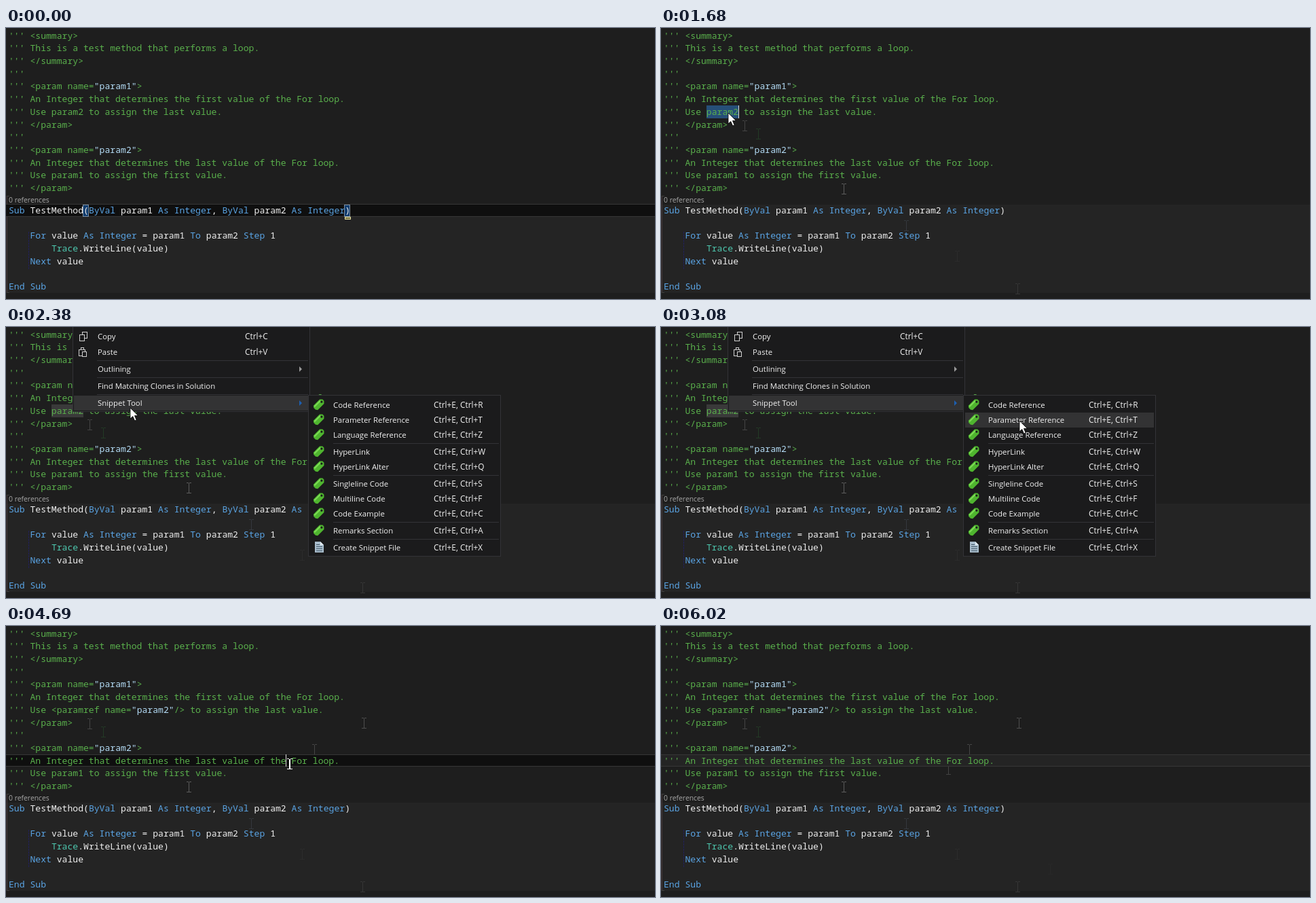
These frames come from a looping animation (956x399 px, 6.09 s). An HTML page with a canvas:

```html
<!DOCTYPE html>
<html lang="en">
<head>
<meta charset="utf-8">
<title>Snippet menu in a code editor</title>
<style>
html, body { margin: 0; width: 100%; height: 100%; overflow: hidden; background: #1e1e1e; }
canvas { display: block; }
</style>
</head>
<body>
<canvas id="stage" width="956" height="399"></canvas>
<script>
const ctx = document.getElementById('stage').getContext('2d');
const LOOP = 6090, STEP = 70;
const X0 = 4, CHAR = 7.86, ROW = 18.7, DOC_TOP = 2.12, CODE_TOP = 259.3;
const MONO = '13.1px "Noto Sans Mono", monospace';
const SANS = '"Open Sans", sans-serif';
const GREEN = '#5ab04c', BLUE = '#5aa4e4', PLAIN = '#efefef', TYPE = '#4ec9b0', VALUE = '#b4dcf6';
const EDGE = '#333337';

const docs = [
  '<summary>', 'This is a test method that performs a loop.', '</summary>', '',
  '<param name="param1">', 'An Integer that determines the first value of the For loop.',
  'Use param2 to assign the last value.', '</param>', '',
  '<param name="param2">', 'An Integer that determines the last value of the For loop.',
  'Use param1 to assign the first value.', '</param>'
];
const code = [
  'Sub TestMethod(ByVal param1 As Integer, ByVal param2 As Integer)', '',
  '    For value As Integer = param1 To param2 Step 1',
  '        Trace.WriteLine(value)', '    Next value', '', 'End Sub'
];
// label, shortcut, vertical centre
const mainItems = [
  ['Copy', 'Ctrl+C', 14], ['Paste', 'Ctrl+V', 36.5], ['Outlining', '', 62],
  ['Find Matching Clones in Solution', '', 87], ['Snippet Tool', '', 112]
];
const subItems = [
  ['Code Reference', 'R', 114.5], ['Parameter Reference', 'T', 136.5], ['Language Reference', 'Z', 158.5],
  ['HyperLink', 'W', 183.5], ['HyperLink Alter', 'Q', 205.5],
  ['Singleline Code', 'S', 230.5], ['Multiline Code', 'F', 252.5], ['Code Example', 'C', 274.5],
  ['Remarks Section', 'A', 299.5], ['Create Snippet File', 'X', 324.5]
];
// time, x, y
const beamIn = [[350, 525, 384], [420, 436, 336], [490, 361, 291], [560, 269, 237],
  [700, 143, 156], [840, 123, 144], [910, 115, 137], [1050, 100, 126]];
const arrowPath = [[2030, 99, 125], [2100, 115, 122], [2170, 146, 120], [2240, 170, 120], [2310, 170, 120],
  [2380, 183, 119], [2660, 380, 119], [2940, 524, 137], [3080, 528, 138]];
const beamOut = [[3780, 527, 143], [3990, 454, 182], [4270, 418, 203], [4690, 418, 203],
  [4760, 423, 211], [4970, 573, 358], [5040, 606, 387]];
// faint cursor traces: time, x, y, colour
const traces = [
  [420, 525, 384, '#363636'], [490, 436, 336, '#2b2b2b'], [560, 361, 291, '#34383d'],
  [630, 269, 237, '#5c5c5c'], [770, 143, 156, '#233a25'], [910, 123, 144, '#444444'],
  [3850, 527, 143, '#4e4e4e'], [4060, 454, 182, '#464646'], [4830, 423, 211, '#424242'],
  [5040, 573, 358, '#282828']
];

function rect(x, y, w, h, color) {
  ctx.fillStyle = color;
  ctx.fillRect(x, y, w, h);
}

function frame(x, y, w, h, fill, stroke) {
  rect(x, y, w, h, stroke);
  rect(x + 1, y + 1, w - 2, h - 2, fill);
}

function text(str, x, y, color, font) {
  ctx.font = font;
  ctx.fillStyle = color;
  ctx.fillText(str, x, y);
}

function poly(points, color) {
  ctx.fillStyle = color;
  ctx.beginPath();
  points.forEach(([x, y]) => ctx.lineTo(x, y));
  ctx.closePath();
  ctx.fill();
}

const col = n => X0 + n * CHAR;
const docTop = row => DOC_TOP + row * ROW;
// whole-pixel top and height of the line that starts at y
const span = y => [Math.floor(y), Math.floor(y + ROW) - Math.floor(y)];

function codeLine(str, top, splitter, colorOf) {
  let n = 0;
  for (const part of str.split(splitter)) {
    text(part, col(n), Math.floor(top) + 14, colorOf(part), MONO);
    n += part.length;
  }
}

const docColor = s => s[0] === '"' ? VALUE : GREEN;
const codeColor = s => s === 'Trace' ? TYPE
  : /^(Sub|ByVal|As|Integer|For|To|Step|Next|End)$/.test(s) ? BLUE : PLAIN;

function along(path, t) {
  let i = 1;
  while (i < path.length - 1 && path[i][0] < t) i++;
  const [t0, x0, y0] = path[i - 1], [t1, x1, y1] = path[i];
  const k = Math.min(1, Math.max(0, (t - t0) / (t1 - t0)));
  return [Math.round(x0 + (x1 - x0) * k), Math.round(y0 + (y1 - y0) * k)];
}

function beam(x, y, color, width = 1) {
  rect(x, y - 7, width, 15, color);
  for (const end of [y - 8, y + 7]) {
    rect(x - 3, end, 3, 1, color);
    rect(x + width, end, 3, 1, color);
  }
}

function arrow(x, y) {
  ctx.save();
  ctx.translate(x, y);
  const shape = [[0, 0], [0, 16], [3.8, 12.6], [6.6, 19], [9.2, 17.9], [6.5, 11.6], [11.6, 11.6]];
  poly(shape, '#fff');
  ctx.strokeStyle = '#000';
  ctx.lineWidth = 0.8;
  ctx.stroke();
  ctx.restore();
}

function lineMark(top, focused = true) {
  const [y, h] = span(top);
  frame(-1, y, 958, h, focused ? '#0f0f0f' : '#242424', '#363636');
}

function caret(n, top) {
  const [y, h] = span(top);
  rect(Math.floor(col(n)), y, 1, h, '#dcdcdc');
}

const blinkOn = (t, start) => (t - start) % 350 < 210;

function editor(t) {
  const inserted = t >= 3500, untouched = t < 1190;
  const first = docTop(6), second = docTop(10);
  rect(0, 0, 956, 399, '#1e1e1e');
  rect(0, 260, 956, 130, '#242424');
  rect(1, 247, 1, 143, '#45373a');
  rect(1, 247, 4, 1, '#3f3f3f');
  rect(1, 389, 4, 1, '#3f3f3f');
  for (let y = 300; y < 353; y += 4) rect(33, y, 1, 3, '#20205c');
  for (const [start, x, y, color] of traces) if (t >= start) beam(x, y, color);

  if (untouched) {
    lineMark(CODE_TOP);
    frame(113, 260, 9, 18, '#113d6f', '#7d8ea0');
    frame(498, 260, 9, 18, '#113d6f', '#7d8ea0');
    frame(499, 278, 9, 4, '#6f6c3c', '#e6e0a0');
  } else if (t < 1330 || inserted && t < 4620) {
    lineMark(first);
  } else if (inserted) {
    lineMark(second, t < 6020);
  } else {
    const [y, h] = span(first);
    rect(67, y, 47, h, t < 1820 ? '#264f78' : '#3a3a3a');
  }

  docs.forEach((line, i) => {
    if (i === 6 && inserted) line = line.replace('param2', '<paramref name="param2"/>');
    codeLine("''' " + line, docTop(i), /("[^"]*")/, docColor);
  });
  text('0 references', 4, 257, '#a8a8a8', '10.4px ' + SANS);
  code.forEach((line, i) => codeLine(line, CODE_TOP + i * ROW, /\b/, codeColor));

  if (untouched) {
    if (!blinkOn(t, 0)) caret(64, CODE_TOP);
  } else if (t < 1330) {
    caret(12, first);
  } else if (t < 1820) {
    if (t < 1470 || t >= 1680) caret(14, first);
  } else if (inserted && t < 4620) {
    if (blinkOn(t, 3500)) caret(33, first);
  } else if (inserted && t < 6020) {
    if (blinkOn(t, 4620)) caret(52, second);
  }
}

function label(str, x, y) {
  text(str, x, y + 4, '#f1f1f1', '11.4px ' + SANS);
}

function shortcut(str, x, y) {
  text(str, x, y + 4, '#f1f1f1', '11.9px ' + SANS);
}

function mainMenu(hover) {
  frame(98, -2, 350, 127, '#1b1b1c', EDGE);
  if (hover) rect(100, 101, 346, 22, '#333334');
  for (const y of [49, 74, 99]) rect(134, y, 311, 1, EDGE);
  for (const [name, keys, y] of mainItems) {
    label(name, 135, y);
    shortcut(keys, 352, y);
  }
  for (const y of [62, 112]) {
    poly([[432, y - 4], [436, y], [432, y + 4]], hover && y > 100 ? '#1c5fb0' : '#999');
  }
  frame(112, 7, 8, 10, '#1b1b1c', '#d0d0d0');
  frame(108, 11, 8, 10, '#1b1b1c', '#d0d0d0');
  frame(107, 33, 10, 10, '#1b1b1c', '#d0d0d0');
  frame(110, 30, 5, 4, '#1b1b1c', '#d0d0d0');
  frame(112, 36, 7, 8, '#1b1b1c', '#d0d0d0');
}

function tag(y) {
  ctx.save();
  ctx.translate(461, y);
  ctx.rotate(-Math.PI / 4);
  poly([[-9, -2], [-7, -4.5], [6, -4.5], [9, -1.5], [9, 1.5], [6, 4.5], [-7, 4.5], [-9, 2]], '#4fb52f');
  rect(-7, -3.5, 12, 2, '#7ddb55');
  ctx.fillStyle = '#1b1b1c';
  ctx.beginPath();
  ctx.arc(5.5, 0, 1.6, 0, 7);
  ctx.fill();
  ctx.restore();
}

function page(y) {
  poly([[455, y - 8], [463, y - 8], [468, y - 3], [468, y + 8], [455, y + 8]], '#a9bdcc');
  poly([[463, y - 8], [468, y - 3], [463, y - 3]], '#e4edf3');
  for (let i = -4; i < 7; i += 3) rect(457, y + i, i < -3 ? 5 : 9, 1, '#3f5566');
}

function subMenu(x, y) {
  frame(445, 100, 284, 238, '#1b1b1c', EDGE);
  if (x >= 447) rect(448, y < 126 ? 104 : 126, 278, 22, '#333334');
  for (const line of [171, 218, 287, 312]) rect(482, line, 244, 1, EDGE);
  for (const [name, key, mid] of subItems) {
    label(name, 482, mid);
    shortcut('Ctrl+E, Ctrl+' + key, 630, mid);
    if (key === 'X') page(Math.floor(mid));
    else tag(mid - 0.5);
  }
}

function draw(t) {
  editor(t);
  const [ax, ay] = along(arrowPath, t);
  if (t >= 1820 && t < 3500) mainMenu(t >= 2100);
  if (t >= 2380 && t < 3500) subMenu(ax, ay);
  if (t >= 1400 && t < 3500) {
    arrow(ax, ay);
  } else if (t >= 350 && t < 5110) {
    const [x, y] = along(t < 1400 ? beamIn : beamOut, t);
    beam(x - 1, y, '#fff', 2);
  }
}

function tick(now) {
  const t = now % LOOP;
  draw(t - t % STEP);
  requestAnimationFrame(tick);
}
requestAnimationFrame(tick);
</script>
</body>
</html>
```
